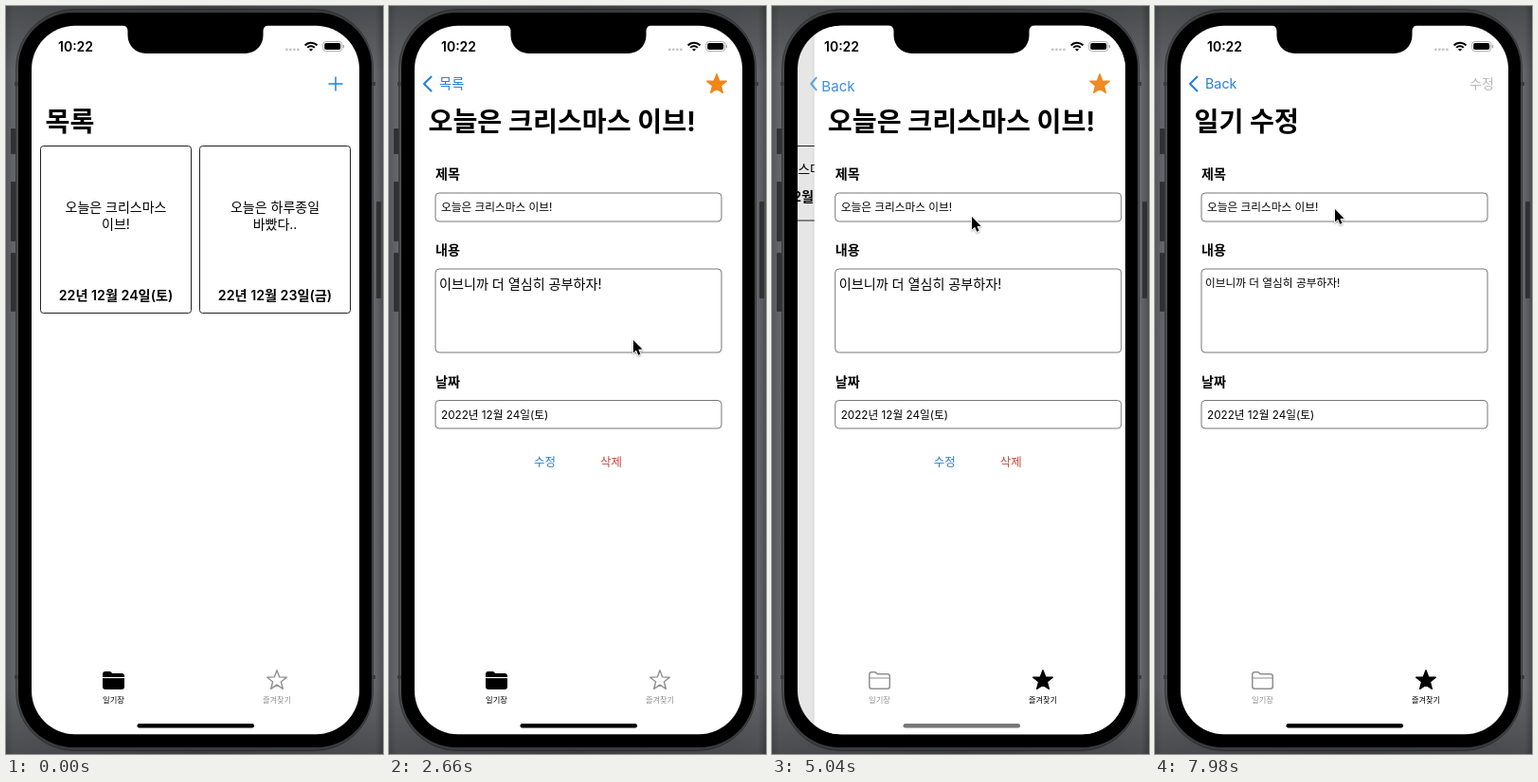
Recreate the animation shown at these times as an HTML page with a canvas. Size 398 by 788 pixels, loop 8000 ms.

```html
<!DOCTYPE html>
<html lang="ko">
<head>
<meta charset="utf-8">
<style>
html, body { margin: 0; width: 100%; height: 100%; overflow: hidden; background: #55575a; }
canvas { display: block; width: 398px; height: 788px; }
</style>
</head>
<body>
<canvas id="stage"></canvas>
<script>
const LOOP = 8000, STEP = 70, WIDTH = 345, PARALLAX = 0.3 * WIDTH;
const FONT = 'Inter, "Noto Sans CJK KR", "Noto Sans CJK", sans-serif';
const BLUE = '#2280dc', ORANGE = '#ef8618', GRAY = '#8f8f8f';
const SCREEN = [27, 20.7, 346, 746.5, 46];
const canvas = document.getElementById('stage');
const ctx = canvas.getContext('2d');
const ratio = window.devicePixelRatio || 1;
canvas.width = 398 * ratio;
canvas.height = 788 * ratio;

const clamp = v => Math.max(0, Math.min(1, v));
const mix = (a, b, k) => a + (b - a) * k;

// Navigation push curve: cubic-bezier(.36, .66, .04, 1)
function ease(x) {
  x = clamp(x);
  const bez = (s, a, b) => 3 * (1 - s) ** 2 * s * a + 3 * (1 - s) * s * s * b + s ** 3;
  let lo = 0, hi = 1;
  for (let i = 0; i < 24; i++) {
    const mid = (lo + hi) / 2;
    if (bez(mid, 0.36, 0.04) < x) lo = mid; else hi = mid;
  }
  return bez(lo, 0.66, 1);
}

function withAlpha(alpha, draw) {
  if (alpha <= 0) return;
  ctx.save();
  ctx.globalAlpha *= clamp(alpha);
  draw();
  ctx.restore();
}

function text(str, x, cy, size, { color = '#000', weight = 400, align = 'left' } = {}) {
  ctx.font = `${weight} ${size}px ${FONT}`;
  ctx.fillStyle = color;
  ctx.textAlign = align;
  ctx.fillText(str, x, cy + size * 0.37);
}

function box(x, y, w, h, r, fill, stroke, line = 1) {
  ctx.beginPath();
  ctx.roundRect(x, y, w, h, r);
  if (fill) { ctx.fillStyle = fill; ctx.fill(); }
  if (stroke) { ctx.strokeStyle = stroke; ctx.lineWidth = line; ctx.stroke(); }
}

function polyline(points, color, width) {
  ctx.beginPath();
  points.forEach(([x, y]) => ctx.lineTo(x, y));
  ctx.strokeStyle = color;
  ctx.lineWidth = width;
  ctx.lineCap = ctx.lineJoin = 'round';
  ctx.stroke();
}

function star(cx, cy, color, filled) {
  ctx.beginPath();
  for (let i = 0; i < 10; i++) {
    const r = i % 2 ? 4.6 : 10.8, a = i * Math.PI / 5 - Math.PI / 2;
    ctx.lineTo(cx + r * Math.cos(a), cy + r * Math.sin(a));
  }
  ctx.closePath();
  ctx.lineJoin = 'round';
  ctx.lineWidth = 1.4;
  ctx.strokeStyle = ctx.fillStyle = color;
  if (filled) ctx.fill();
  ctx.stroke();
}

function folder(active) {
  if (active) {
    box(102, 701, 10, 8, [3, 3, 0, 0], '#000');
    box(102, 703, 23, 17, 3, '#000');
    ctx.fillStyle = '#fff';
    ctx.fillRect(102, 707, 23, 1.1);
    return;
  }
  ctx.beginPath();
  ctx.moveTo(102.8, 705);
  ctx.arcTo(102.8, 701.8, 106, 701.8, 2.5);
  ctx.lineTo(109, 701.8);
  ctx.lineTo(111.5, 703.8);
  ctx.arcTo(124.3, 703.8, 124.3, 707, 2.5);
  ctx.arcTo(124.3, 719.2, 120, 719.2, 2.5);
  ctx.arcTo(102.8, 719.2, 102.8, 715, 2.5);
  ctx.closePath();
  ctx.strokeStyle = GRAY;
  ctx.lineWidth = 1.5;
  ctx.stroke();
  polyline([[103, 708], [124, 708]], GRAY, 1.2);
}

function card(x, lines, date) {
  box(x, 147.5, 159, 176, 3, null, '#222');
  lines.forEach((line, i) => text(line, x + 79.5, 212 + 18 * i, 14, { align: 'center' }));
  text(date, x + 79.5, 304.5, 14.2, { weight: 600, align: 'center' });
}

function form(bodySize) {
  const rows = [
    ['제목', 177, 197, 30, '오늘은 크리스마스 이브!', 55, 212, 11.7],
    ['내용', 257, 277, 88, '이브니까 더 열심히 공부하자!', 53, bodySize > 13 ? 293 : 291.5, bodySize],
    ['날짜', 395.5, 415.5, 29.5, '2022년 12월 24일(토)', 55, 430.5, 11.7]
  ];
  for (const [label, labelY, top, height, value, x, y, size] of rows) {
    text(label, 49, labelY, 14.1, { weight: 600 });
    box(49, top, 302, height, 4, null, '#777');
    text(value, x, y, size);
  }
}

const pages = {
  list: {
    title: '목록',
    body() {
      card(36.5, ['오늘은 크리스마스', '이브!'], '22년 12월 24일(토)');
      card(204.5, ['오늘은 하루종일', '바빴다..'], '22년 12월 23일(금)');
    },
    action() {
      polyline([[341, 82], [355, 82]], BLUE, 1.5);
      polyline([[348, 75], [348, 89]], BLUE, 1.5);
    }
  },
  favourites: {
    title: '',
    body(t) {
      if (t < 3570) return;
      box(36.5, 147.5, 327, 78.5, 3, null, '#222');
      text('오늘은 크리스마스 이브!', 57, 172, 14);
      text('22년 12월 24일(토)', 80, 201, 14.2, { weight: 600 });
    },
    action() {}
  },
  detail: {
    title: '오늘은 크리스마스 이브!',
    back: t => t < 3500 ? '목록' : 'Back',
    body(t) {
      form(14.1);
      withAlpha(t >= 6160 && t < 6400 ? 0.25 : 1, () =>
        text('수정', 153, 480, 12.5, { color: '#2a7fc6' }));
      text('삭제', 223, 480, 12.5, { color: '#cb4338' });
    },
    action: t => star(346, 82.6, t < 2030 ? '#dc8a2c' : ORANGE, t >= 2030)
  },
  edit: {
    title: '일기 수정',
    back: () => 'Back',
    body: () => form(11.7),
    action: () => text('수정', 332, 81.5, 14, { color: '#b9b9b9' })
  }
};

const pushes = [
  [830, 'list', 'detail'],
  [4778, 'favourites', 'detail'],
  [6267, 'detail', 'edit']
];

function chevron(shift) {
  const k = 1 - shift / 30;
  polyline([[44.5 + shift / 2, 82 - 7.5 * k], [37 + shift, 82], [44.5 + shift / 2, 82 + 7.5 * k]], BLUE, 2);
}

function drawBody(page, t, dx) {
  ctx.save();
  ctx.translate(dx, 0);
  page.body(t);
  ctx.restore();
}

function drawStill(page, t) {
  drawBody(page, t, 0);
  text(page.title, 41.5, 122, 28.2, { weight: 700 });
  if (page.back) {
    chevron(0);
    text(page.back(t), 53, 81.5, 14.3, { color: BLUE });
  }
  page.action(t);
}

function drawPush(from, to, p, t) {
  const rest = WIDTH * (1 - p), edge = 27 + rest;
  drawBody(from, t, -PARALLAX * p);
  ctx.fillStyle = `rgba(0,0,0,${0.11 * p * p})`;
  ctx.fillRect(27, 20, 346, 748);
  ctx.fillStyle = `rgba(0,0,0,${0.04 * p * p})`;
  ctx.fillRect(edge - 2, 20, 2, 748);
  ctx.fillStyle = '#fff';
  ctx.fillRect(edge, 20, 346, 748);
  drawBody(to, t, rest);

  // The large title shrinks into the next back button
  const m = p ** 1.2, x = mix(41.5, 53, m), y = mix(122, 81.5, m), size = mix(28.2, 14.3, m);
  withAlpha(1 - 1.8 * m, () => text(from.title, x, y, size, { weight: 700 }));
  withAlpha(2 * m - 1, () => text(to.back(t), x, y, size, { color: BLUE }));
  if (from.back) {
    chevron(0);
    withAlpha(1 - 1.2 * p * p, () => text(from.back(t), 53 - 37 * p, 81.5, 14.3, { color: BLUE }));
  } else {
    withAlpha((p - 0.9) / 0.07, () => chevron(Math.min(8, 85 * (1 - p))));
  }
  withAlpha(1.5 * p, () => text(to.title, 41.5 + rest * mix(1.06, 0.97, p), 122, 28.2, { weight: 700 }));
  withAlpha(1 - 1.2 * p * p, () => from.action(t));
  withAlpha(p, () => to.action(t));
}

function drawScreen(t) {
  const push = pushes.find(([start]) => t >= start && t < start + 500);
  if (push) {
    drawPush(pages[push[1]], pages[push[2]], ease((t - push[0]) / 500), t);
  } else {
    const name = t < 830 ? 'list' : t < 3500 ? 'detail' : t < 4778 ? 'favourites' : t < 6500 ? 'detail' : 'edit';
    drawStill(pages[name], t);
  }
}

function drawTabs(t) {
  const starred = t >= 3500;
  folder(!starred);
  star(286, 710.6, starred ? '#000' : GRAY, starred);
  text('일기장', 113.5, 730.5, 8.3, { color: starred ? GRAY : '#000', align: 'center', weight: 500 });
  text('즐겨찾기', 286, 730.5, 8.2, { color: starred ? '#000' : GRAY, align: 'center', weight: 500 });
  box(138.5, 756, 123.5, 4.4, 2.2, t >= 4760 && t < 7140 ? '#777' : '#000');
}

function drawStatus() {
  text('10:22', 55, 42.5, 14, { weight: 600 });
  for (let i = 0; i < 4; i++) box(295 + i * 4, 44.5, 2.7, 2.7, 1.3, '#c4c4c4');
  ctx.strokeStyle = ctx.fillStyle = '#000';
  ctx.lineCap = 'butt';
  ctx.lineWidth = 2;
  for (const r of [1.6, 5.2, 8.8]) {
    ctx.beginPath();
    ctx.arc(322, 47.5, r, -Math.PI * 0.76, -Math.PI * 0.24);
    ctx.stroke();
  }
  ctx.beginPath();
  ctx.moveTo(322, 47.8);
  ctx.arc(322, 47.5, 2.4, -Math.PI * 0.76, -Math.PI * 0.24);
  ctx.fill();
  box(334.7, 37.5, 20, 10, 3, null, '#a5a5a5', 0.9);
  box(336.2, 39, 17, 7, 1.8, '#000');
  box(355.7, 40.8, 1.3, 3.6, 0.7, '#a5a5a5');
}

function gradient(x, y, colors) {
  const fill = ctx.createLinearGradient(0, 0, x, y);
  for (const [at, color] of colors) fill.addColorStop(at, color);
  ctx.fillStyle = fill;
  ctx.fillRect(0, 0, 398, 788);
}

function drawPhone() {
  gradient(398, 0, [[0, '#56585b'], [0.02, '#636568'], [0.5, '#505255'], [0.98, '#636568'], [1, '#4c4e51']]);
  for (const [x, y, h] of [[5, 129, 27], [5, 185, 63], [5, 260, 62], [391, 206, 102]])
    box(x, y, 5, h, 1, '#303133');
  box(10.5, 3.5, 377, 781, 62, '#4a4c4e', '#38393b');
  for (const y of [80, 705]) {
    ctx.fillStyle = '#3a3b3d';
    ctx.fillRect(9, y, 4, 4);
    ctx.fillRect(386, y, 4, 4);
  }
  const shade = 'rgba(0,0,0,.25)', clear = 'rgba(0,0,0,0)';
  gradient(0, 788, [[0, shade], [0.09, clear], [0.91, clear], [1, shade]]);
  box(13, 7, 373, 774, 58, '#000');
  box(...SCREEN, '#fff');
}

function drawNotch() {
  ctx.beginPath();
  ctx.moveTo(121, 20);
  ctx.arcTo(128.5, 20, 128.5, 28, 6);
  ctx.arcTo(128.5, 50, 149, 50, 19);
  ctx.arcTo(271.5, 50, 271.5, 30, 19);
  ctx.arcTo(271.5, 20, 279, 20, 6);
  ctx.closePath();
  ctx.fillStyle = '#000';
  ctx.fill();
}

// Pointer stops: time, x, y
const stops = [
  [140, 400, 430], [560, 148, 262], [1190, 148, 261], [1680, 341, 93], [2100, 341, 93],
  [2590, 266, 330], [2870, 214, 470], [3150, 300, 716], [3290, 290, 714], [3500, 290, 714],
  [4270, 232, 288], [4480, 211, 222], [5390, 211, 222], [6090, 166, 480], [6370, 166, 480],
  [7000, 173, 215], [7700, 173, 215], [7840, 175, 204], [7980, 190, 214]
];
const touches = [[690, 830], [1890, 2030], [3290, 3500], [4620, 4760], [6160, 6300], [7140, 7210]];

function drawPointer(t) {
  if (t < stops[0][0]) return;
  const i = stops.findIndex(stop => stop[0] >= t);
  const b = stops[i], a = stops[Math.max(0, i - 1)];
  const k = b === a ? 0 : (t - a[0]) / (b[0] - a[0]), s = k * k * (3 - 2 * k);
  const x = mix(a[1], b[1], s), y = mix(a[2], b[2], s);
  if (touches.some(([from, to]) => t >= from && t < to)) {
    ctx.beginPath();
    ctx.arc(x, y, 23, 0, 7);
    ctx.fillStyle = 'rgba(120,120,120,.35)';
    ctx.fill();
  }
  ctx.save();
  ctx.translate(x, y);
  ctx.beginPath();
  for (const [px, py] of [[0, 0], [0, 13.5], [3.1, 10.7], [5.3, 15.8], [7.6, 14.8], [5.4, 9.9], [9.6, 9.7]])
    ctx.lineTo(px, py);
  ctx.closePath();
  ctx.lineJoin = 'round';
  ctx.lineWidth = 1.8;
  ctx.strokeStyle = '#fff';
  ctx.fillStyle = '#000';
  ctx.shadowColor = 'rgba(0,0,0,.35)';
  ctx.shadowBlur = 2 * ratio;
  ctx.shadowOffsetY = ratio;
  ctx.stroke();
  ctx.shadowColor = 'transparent';
  ctx.fill();
  ctx.restore();
}

function render(now) {
  const t = Math.floor((now % LOOP) / STEP) * STEP;
  ctx.setTransform(ratio, 0, 0, ratio, 0, 0);
  drawPhone();
  ctx.save();
  ctx.beginPath();
  ctx.roundRect(...SCREEN);
  ctx.clip();
  drawScreen(t);
  drawTabs(t);
  drawStatus();
  ctx.restore();
  drawNotch();
  drawPointer(t);
}

const origin = performance.now();
function tick() {
  render(performance.now() - origin);
  requestAnimationFrame(tick);
}
tick();
</script>
</body>
</html>
```
